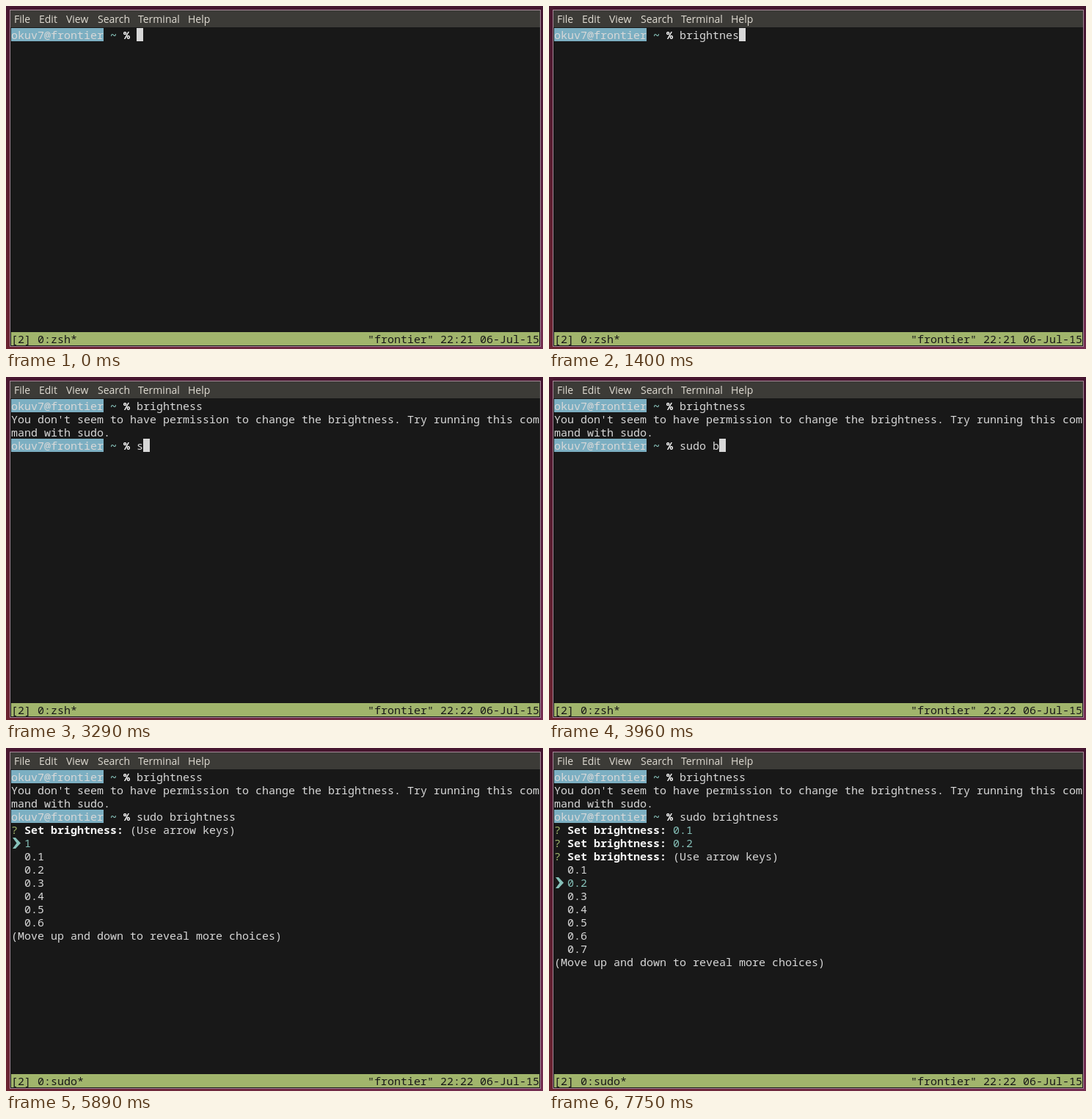
Animation of 732x467 px, one loop 8 s. Source, as an HTML page:

```html
<!DOCTYPE html>
<html lang="en">
<head>
<meta charset="utf-8">
<style>
html, body { margin: 0; width: 100%; height: 100%; overflow: hidden; background: #4a1830; }
svg { display: block; }
text { white-space: pre; }
#menu { font: 14px "Open Sans", sans-serif; fill: #dfdbd2; }
#term { font: 15px "Noto Sans Mono", monospace; }
</style>
</head>
<body>
<svg width="732" height="467" viewBox="0 0 732 467">
  <defs>
    <linearGradient id="left" x2="0" y2="1"><stop stop-color="#4a1830"/><stop offset="1" stop-color="#6c2431"/></linearGradient>
    <linearGradient id="right" x2="0" y2="1"><stop stop-color="#43142f"/><stop offset="1" stop-color="#732c50"/></linearGradient>
    <linearGradient id="foot"><stop stop-color="#6c2431"/><stop offset="1" stop-color="#732c50"/></linearGradient>
  </defs>
  <rect width="732" height="467" fill="#47162f"/>
  <rect width="6" height="467" fill="url(#left)"/>
  <rect x="728" width="4" height="467" fill="url(#right)"/>
  <rect y="463" width="732" height="4" fill="url(#foot)"/>
  <rect x="5.5" y="5.5" width="723" height="458" fill="#181818" stroke="#a48797"/>
  <rect x="6" y="6" width="722" height="23" fill="#3c3b37"/>
  <g id="menu"></g>
  <g id="term"></g>
</svg>
<script>
const LOOP = 8000, CW = 9, LH = 18, X0 = 7, Y0 = 30;
const FG = '#d8d8d8', BG = '#181818', WHITE = '#f8f8f8', BLUE = '#7cafc2', GREEN = '#a1b56c', CYAN = '#86c1b9';
const PROMPT_COLS = 19;
const values = [0.1, 0.2, 0.3, 0.4, 0.5, 0.6, 0.7, 0.8, 0.9, 1];

// Time at which each character is typed
const keys1 = [440, 530, 620, 810, 1010, 1070, 1240, 1320, 1400, 1550];
const keys2 = [3290, 3500, 3560, 3710, 3790, 3960, 4030, 4140, 4250, 4410, 4520, 4750, 4830, 4910, 5080];
const cursorOff = [[170, 440], [2250, 2320], [2840, 3290], [5760, LOOP]];

const menu = [['File', 11], ['Edit', 45], ['View', 82], ['Search', 125], ['Terminal', 180], ['Help', 248]];
document.getElementById('menu').innerHTML =
  menu.map(([label, x]) => `<text x="${x}" y="23">${label}</text>`).join('');

const px = col => X0 + col * CW;
const py = row => Y0 + row * LH;
const put = (row, col, str, fill = FG, bold = false) =>
  `<text x="${px(col)}" y="${py(row) + 15}" fill="${fill}"${bold ? ' font-weight="700"' : ''}>${str}</text>`;
const block = (row, col, cols, fill) =>
  `<rect x="${px(col)}" y="${py(row)}" width="${cols * CW}" height="${LH}" fill="${fill}"/>`;

const typed = (str, times, t) => str.slice(0, times.filter(k => k <= t).length);

const prompt = (row, cmd) =>
  block(row, 0, 14, BLUE) + put(row, 0, 'okuv7@frontier') +
  put(row, 15, '~', CYAN, true) + put(row, 17, '%', WHITE, true) + put(row, PROMPT_COLS, cmd);

const question = (row, str, fill) =>
  put(row, 0, '?', GREEN) + put(row, 2, 'Set brightness:', WHITE, true) + put(row, 18, str, fill);

const pointer = row =>
  `<path transform="translate(8 ${py(row)})" d="M1 2h4l7 7.5-7 7.5h-4l5.5-7.5z" fill="${CYAN}"/>`;

// Seven choices starting at index `first`, wrapping round
function list(row, first, active) {
  let out = pointer(row + active);
  for (let i = 0; i < 7; i++)
    out += put(row + i, 2, values[(first + i) % values.length], i === active ? CYAN : FG);
  return out + put(row + 7, 0, '(Move up and down to reveal more choices)');
}

function dialog(t) {
  const hint = '(Use arrow keys)';
  const answers = (t >= 7200) + (t >= 7750);
  const moved = (t >= 7010 && t < 7200) || (t >= 7490 && t < 7750);
  let out = '';
  for (let i = 0; i < answers; i++) out += question(4 + i, values[i], CYAN);
  out += question(4 + answers, moved ? '' : hint);
  return out + list(5 + answers, t < 7010 ? 9 : 0, t < 7490 ? 0 : 1);
}

function status(t) {
  const job = t >= 5290 ? 'sudo' : t >= 1880 && t < 2400 ? 'node' : 'zsh';
  const clock = t >= 1880 ? '22:22' : '22:21';
  return block(23, 0, 80, GREEN) + put(23, 0, `[2] 0:${job}*`, BG) +
    put(23, 54, `"frontier" ${clock} 06-Jul-15`, BG);
}

function screen(t) {
  const cmd1 = typed('brightness', keys1, t), cmd2 = typed('sudo brightness', keys2, t);
  let out = prompt(0, cmd1);
  let cursor = t < 1690 ? [0, PROMPT_COLS + cmd1.length] : [1, 0];
  if (t >= 2320) {
    out += put(1, 0, "You don't seem to have permission to change the brightness. Try running this com") +
      put(2, 0, 'mand with sudo.') + prompt(3, cmd2);
    cursor = t < 5200 ? [3, PROMPT_COLS + cmd2.length] : [4, 0];
  }
  if (t >= 5890) out += dialog(t);
  if (!cursorOff.some(([a, b]) => t >= a && t < b)) out += block(...cursor, 1, FG);
  return out + status(t);
}

const term = document.getElementById('term');
let start, last;
function tick(now) {
  start ??= now;
  const html = screen((now - start) % LOOP);
  if (html !== last) term.innerHTML = last = html;
  requestAnimationFrame(tick);
}
term.innerHTML = last = screen(0);
requestAnimationFrame(tick);
</script>
</body>
</html>
```
